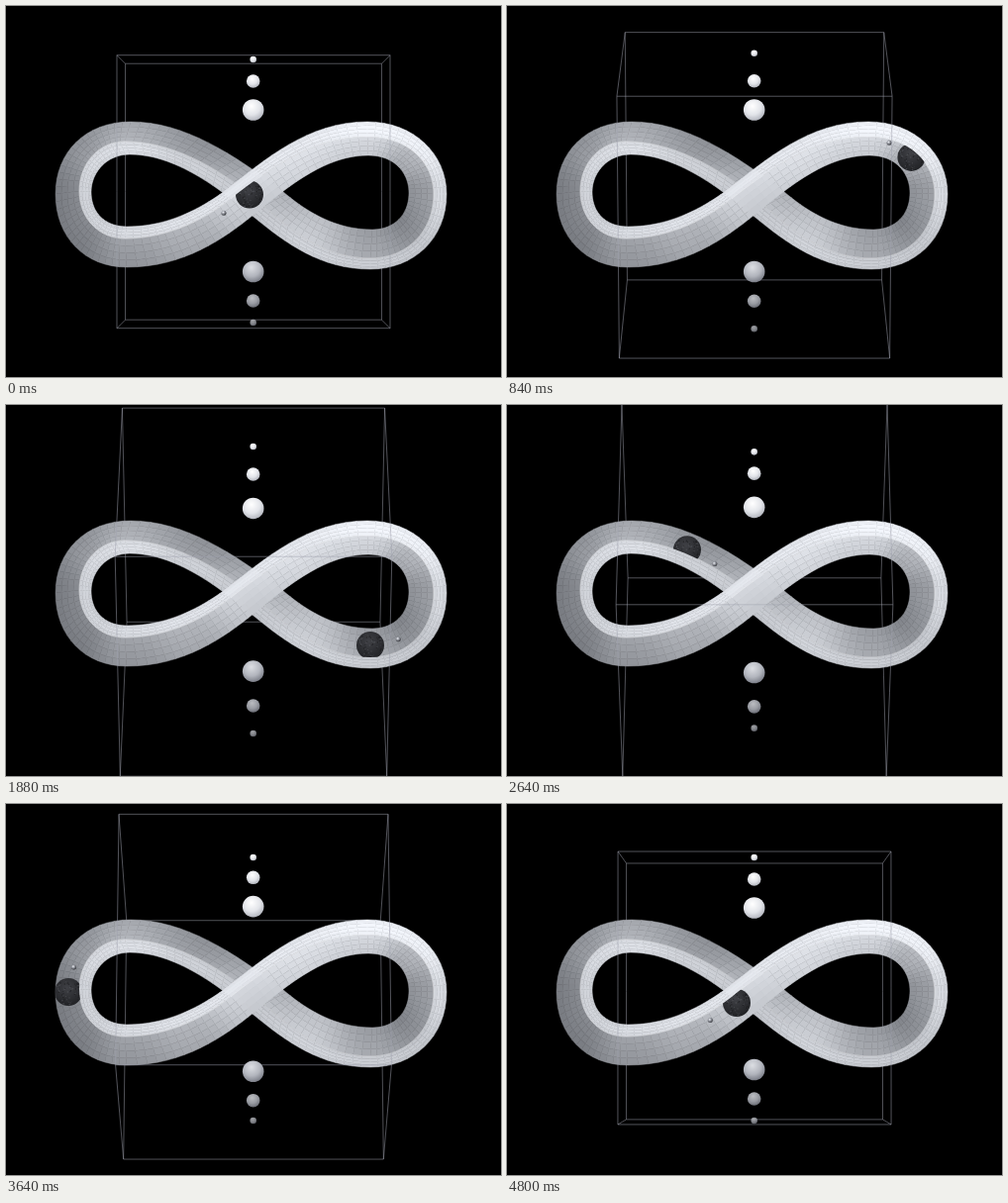
Recreate the animation shown at these times as an HTML page. Size 500 px wide and 375 px high, loop 4840 ms.

```html
<!DOCTYPE html>
<html lang="en">
<head>
<meta charset="utf-8">
<title>Infinity loop</title>
<style>
html, body { margin: 0; width: 100%; height: 100%; overflow: hidden; background: #000; }
svg { display: block; width: 100vw; height: 100vh; }
</style>
</head>
<body>
<svg id="stage" viewBox="0 0 500 375" xmlns="http://www.w3.org/2000/svg">
  <defs>
    <radialGradient id="pearl" cx=".42" cy=".32" r=".75">
      <stop offset="0" stop-color="#fff"/><stop offset=".55" stop-color="#e2e4e9"/><stop offset="1" stop-color="#a9acb5"/>
    </radialGradient>
    <radialGradient id="ash" cx=".42" cy=".3" r=".75">
      <stop offset="0" stop-color="#dcdee3"/><stop offset=".55" stop-color="#b3b6be"/><stop offset="1" stop-color="#747781"/>
    </radialGradient>
    <radialGradient id="coal" cx=".45" cy=".35" r=".7">
      <stop offset="0" stop-color="#3f4045"/><stop offset="1" stop-color="#1f2023"/>
    </radialGradient>
    <radialGradient id="bead" cx=".38" cy=".35" r=".7">
      <stop offset="0" stop-color="#eef0f4"/><stop offset=".4" stop-color="#9a9da5"/><stop offset="1" stop-color="#2b2c31"/>
    </radialGradient>
    <clipPath id="backClip"><polygon/></clipPath>
    <clipPath id="frontClip"><polygon/></clipPath>
  </defs>
  <rect width="500" height="375" fill="#000"/>
  <path id="farEdges" fill="none" stroke="#a0a2ae" stroke-opacity=".5"/>
  <g id="backBand"></g>
  <g id="backHold" clip-path="url(#backClip)"></g>
  <g id="frontBand"></g>
  <g id="frontHold" clip-path="url(#frontClip)"></g>
  <path id="nearEdges" fill="none" stroke="#a0a2ae" stroke-opacity=".52"/>
  <g id="dots"></g>
</svg>
<script>
const LOOP = 4840, STEP = 40;
const $ = id => document.getElementById(id);
const mix = (a, b, k) => a + (b - a) * k;
const mod = (a, n) => ((a % n) + n) % n;

function add(parent, tag, attrs) {
  const el = document.createElementNS('http://www.w3.org/2000/svg', tag);
  for (const k in attrs) el.setAttribute(k, attrs[k]);
  parent.appendChild(el);
  return el;
}

// Closed curves of eight cubic pieces; u runs from 0 to 8.
function curve(text) {
  const n = text.split(' ').map(Number);
  return u => {
    u = mod(u, 8);
    const i = Math.floor(u) * 6, t = u % 1, s = 1 - t;
    const at = j => s * s * s * n[j] + 3 * s * s * t * n[j + 2] + 3 * s * t * t * n[j + 4] + t * t * t * n[j + 6];
    return [at(i), at(i + 1)];
  };
}
const rimEdge = curve('122 223 160 223 192 208 221 187 262 155 305 117 365 117 412 117 445 150 445 190 445 235 412 266 368 266 318 266 283 240 250 213 205 175 165 150 125 150 102 150 86 168 86 188 86 209 100 223 122 223');
const fold = curve('120 235 165 235 205 214 233 190 275 158 315 132 365 132 405 132 432 157 432 190 432 228 405 255 368 255 320 255 285 225 255 197 210 160 165 137 120 137 93 137 74 160 74 187 74 215 94 235 120 235');
const faceEdge = curve('122 264 180 264 220 235 250 211 290 178 325 151 366 151 392 151 407 168 407 189 407 211 392 226 370 226 330 226 300 205 279 187 230 150 180 117 126 117 80 117 50 148 50 190 50 234 80 264 122 264');
const track = curve('125 246 165 246 203 221 232 201 270 173 315 134 362 134 398 134 424 160 424 192 424 222 400 243 368 243 325 243 292 217 262 193 215 162 165 131 122 131 88 131 63 158 63 190 63 221 87 246 125 246');

// Grey levels along the band, one per half piece.
const faceTone = [152, 172, 204, 216, 208, 176, 150, 138, 160, 196, 182, 150, 172, 150, 128, 128];
const rimTone = [214, 222, 226, 228, 240, 236, 212, 196, 200, 206, 196, 204, 218, 214, 206, 208];

function tone(list, u) {
  const p = mod(u * 2, 16), i = Math.floor(p);
  const k = (1 - Math.cos(Math.PI * (p - i))) / 2;
  return mix(list[i], list[(i + 1) % 16], k);
}
const between = (a, b, k, u) => {
  const p = a(u), q = b(u);
  return [mix(p[0], q[0], k), mix(p[1], q[1], k)];
};

function strip(parent, a, b, from, to, tones, shade) {
  const d = 1 / 16, lanes = 4;
  for (let u = from; u < to; u += d) {
    for (let j = 0; j < lanes; j++) {
      const k0 = j / lanes, k1 = (j + 1) / lanes;
      const g = Math.min(246, Math.round(tone(tones, u + d / 2) + shade((k0 + k1) / 2)));
      const color = `rgb(${g},${Math.min(255, g + 3)},${Math.min(255, g + 9)})`;
      const points = [between(a, b, k0, u), between(a, b, k0, u + d), between(a, b, k1, u + d), between(a, b, k1, u)];
      add(parent, 'polygon', { points: points.join(' '), fill: color, stroke: color, 'stroke-width': .5 });
    }
  }
}

function line(c, from, to) {
  const out = [];
  for (let u = from; u <= to + 1e-6; u += 1 / 16) out.push(c(u));
  return out;
}

function band(parent, from, to) {
  strip(parent, fold, faceEdge, from, to, faceTone, k => 8 - 16 * k);
  strip(parent, rimEdge, fold, from, to, rimTone, k => 10 * Math.sin(Math.PI * k) - 6);
  add(parent, 'polyline', {
    points: line(fold, from, to).join(' '), fill: 'none', stroke: '#fff', 'stroke-opacity': .22, 'stroke-width': 1
  });
}
band($('backBand'), 2, 8);
band($('frontBand'), 0, 2);

function clipFace(id, from, to) {
  const points = line(fold, from, to).concat(line(faceEdge, from, to).reverse());
  $(id).firstChild.setAttribute('points', points.join(' '));
}
clipFace('backClip', 2, 8);
clipFace('frontClip', -2, 4);

// Arc length along the track.
const FINE = 50, spots = [], run = [0];
for (let i = 0; i <= 8 * FINE; i++) {
  spots.push(track(i / FINE));
  if (i) run.push(run[i - 1] + Math.hypot(spots[i][0] - spots[i - 1][0], spots[i][1] - spots[i - 1][1]));
}
const total = run[8 * FINE];
const lengthAt = u => run[Math.round(mod(u, 8) * FINE)] + Math.floor(u / 8) * total;

function place(len) {
  len = mod(len, total);
  let i = 1;
  while (run[i] < len) i++;
  const k = (len - run[i - 1]) / (run[i] - run[i - 1]);
  return {
    x: mix(spots[i - 1][0], spots[i][0], k),
    y: mix(spots[i - 1][1], spots[i][1], k),
    u: (i - 1 + k) / FINE
  };
}

// Time, place on the track, speed in px per ms.
const pace = [
  [0, 1.13, .4], [480, 2, .17], [1240, 3, .1], [1880, 4, .2],
  [2640, 5.56, .24], [3640, 7, .11], [4800, 9, .4], [4840, 9.13, .4]
].map(([t, u, v]) => [t, lengthAt(u), v]);

function travelled(t) {
  let i = 0;
  while (t >= pace[i + 1][0]) i++;
  const [t0, a, va] = pace[i], [t1, b, vb] = pace[i + 1];
  const h = t1 - t0, k = (t - t0) / h, k2 = k * k, k3 = k2 * k;
  return (2 * k3 - 3 * k2 + 1) * a + (k3 - 2 * k2 + k) * h * va + (3 * k2 - 2 * k3) * b + (k3 - k2) * h * vb;
}

const ball = add($('backHold'), 'g', {});
add(ball, 'circle', { r: 14, fill: 'url(#coal)' });
let seed = 7;
const random = () => (seed = seed * 16807 % 2147483647) / 2147483647;
for (let i = 0; i < 70; i++) {
  const a = random() * 6.283, r = 13 * Math.sqrt(random());
  add(ball, 'circle', {
    cx: (r * Math.cos(a)).toFixed(1), cy: (r * Math.sin(a)).toFixed(1), r: .4 + .4 * random(),
    fill: i % 2 ? '#5b5d63' : '#141517', 'fill-opacity': .55
  });
}
const moon = add($('backHold'), 'circle', { r: 2.5, fill: 'url(#bead)' });

function put(el, p) {
  const hold = p.u > 7 || p.u < 3 ? $('frontHold') : $('backHold');
  if (el.parentNode !== hold) hold.appendChild(el);
  el.setAttribute('transform', `translate(${p.x.toFixed(2)} ${p.y.toFixed(2)})`);
}

// Dots: rest height, radius, reach, delay.
const dots = [
  [54, 3.3, -12, 0, 'pearl'], [76, 6.8, -7, 640, 'pearl'], [105, 10.8, -1.8, 1280, 'pearl'],
  [268.5, 10.8, 2.2, 1280, 'ash'], [298, 6.8, 7, 640, 'ash'], [320, 3.3, 12, 0, 'ash']
].map(([y, r, reach, delay, fill]) => ({
  y, reach, delay,
  el: add($('dots'), 'circle', { cx: 249.7, r, fill: `url(#${fill})`, opacity: fill === 'ash' ? .6 + r / 27 : 1 })
}));
const ease = k => (1 - Math.cos(Math.PI * Math.max(0, Math.min(1, k)))) / 2;
const swell = t => ease(t / 1640) - ease((t - 1840) / 1720);

// Cube turning a quarter per loop about the horizontal axis.
const edges = [];
for (const a of [-1, 1]) for (const b of [-1, 1]) {
  edges.push([[-1, a, b], [1, a, b]], [[a, -1, b], [a, 1, b]], [[a, b, -1], [a, b, 1]]);
}
function drawCube(angle) {
  const c = Math.cos(angle), s = Math.sin(angle), size = 133.6, eye = 4200;
  const spin = ([x, y, z]) => [x, y * c + z * s, z * c - y * s];
  const flat = ([x, y, z]) => {
    const f = size * eye / (eye - z * size);
    return `${(250 + x * f).toFixed(2)} ${(187.7 + y * f).toFixed(2)}`;
  };
  let near = '', far = '';
  for (const [p, q] of edges) {
    const a = spin(p), b = spin(q), m = a.map((v, i) => (v + b[i]) / 2);
    for (const end of [a, b]) {
      const d = `M${flat(end)}L${flat(m)}`;
      if (end[2] + m[2] > 0) near += d; else far += d;
    }
  }
  $('nearEdges').setAttribute('d', near);
  $('farEdges').setAttribute('d', far);
}

function draw(t) {
  drawCube(t / LOOP * Math.PI / 2);
  for (const d of dots) d.el.setAttribute('cy', (d.y + d.reach * swell(t - d.delay)).toFixed(2));
  const len = travelled(t), p = place(len);
  put(ball, p);
  put(moon, place(len - 32 + 6 * ((p.x - 245) / 180) ** 2));
}

function tick() {
  draw(Math.floor(performance.now() % LOOP / STEP) * STEP);
  requestAnimationFrame(tick);
}
tick();
</script>
</body>
</html>
```
